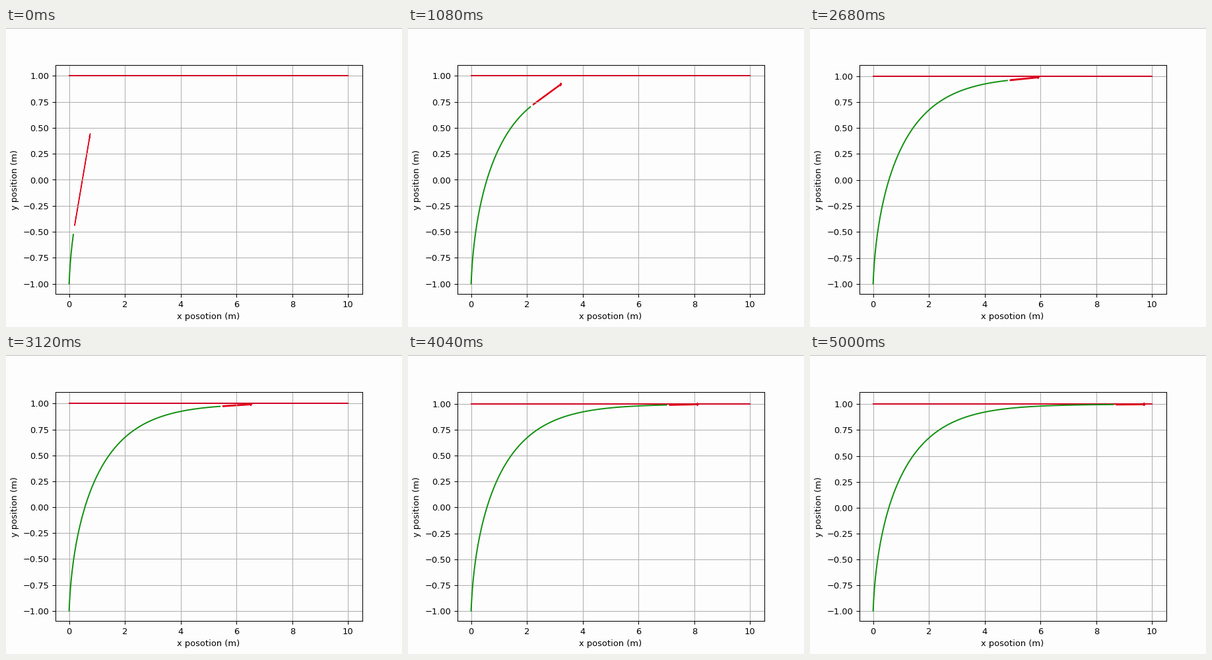
A matplotlib script that plays this animation: 600x452 px, repeating every 5040 ms.

```python
import numpy as np
import matplotlib.pyplot as plt
from matplotlib.animation import FuncAnimation
from matplotlib.lines import Line2D

WIDTH, HEIGHT, DPI = 600, 452, 93.75
FRAMES, INTERVAL = 126, 40
BACK = "#fdfdfd"
GREEN, LINE_RED, ARROW_RED = "#109010", "#d00222", "#e2001a"

# Vehicle steering towards y = 1: the heading is proportional to the offset.
SPEED, GAIN, DT, STEPS = 1.0, 0.7, 0.1, 100

# Steps reached at a few moments; the pace varies slightly between them.
KEY_FRAMES = [0, 27, 51, 67, 88, 101, 125]
KEY_STEPS = [6, 30, 45, 57, 69, 79, 95]


def simulate():
    x, y = 0.0, -1.0
    states = []
    for _ in range(STEPS):
        heading = GAIN * (1 - y)
        states.append((x, y, heading))
        x += SPEED * DT * np.cos(heading)
        y += SPEED * DT * np.sin(heading)
    return np.array(states)


path = simulate()

# A hair of extra size keeps the pixel count from rounding down.
fig = plt.figure(figsize=((WIDTH + 1e-6) / DPI, (HEIGHT + 1e-6) / DPI),
                 dpi=DPI, facecolor=BACK)
ax = fig.add_axes([74.5 / WIDTH, 49.5 / HEIGHT, 465 / WIDTH, 346 / HEIGHT],
                  facecolor=BACK)


def window_edge(xs, ys, color):
    fig.add_artist(Line2D(xs, ys, color=color, lw=72 / DPI,
                          transform=fig.transFigure))


window_edge([0, 1], [1 - 0.5 / HEIGHT] * 2, "#c0c0c0")
window_edge([1 - 0.5 / WIDTH] * 2, [0, 1], "#606060")


def draw(frame):
    step = int(round(np.interp(frame, KEY_FRAMES, KEY_STEPS)))
    x, y, heading = path[step]
    ax.clear()
    ax.plot([0, 10], [1, 1], color=LINE_RED)
    ax.plot(path[:step, 0], path[:step, 1], color=GREEN)
    ax.arrow(x, y, np.cos(heading), np.sin(heading), width=0.01,
             color=ARROW_RED)
    ax.set_xlabel("x posotion (m)")
    ax.set_ylabel("y position (m)")
    ax.grid(True)
    return ax.get_children()


anim = FuncAnimation(fig, draw, frames=FRAMES, interval=INTERVAL,
                     repeat=True, repeat_delay=0, blit=False)
plt.show()
```
